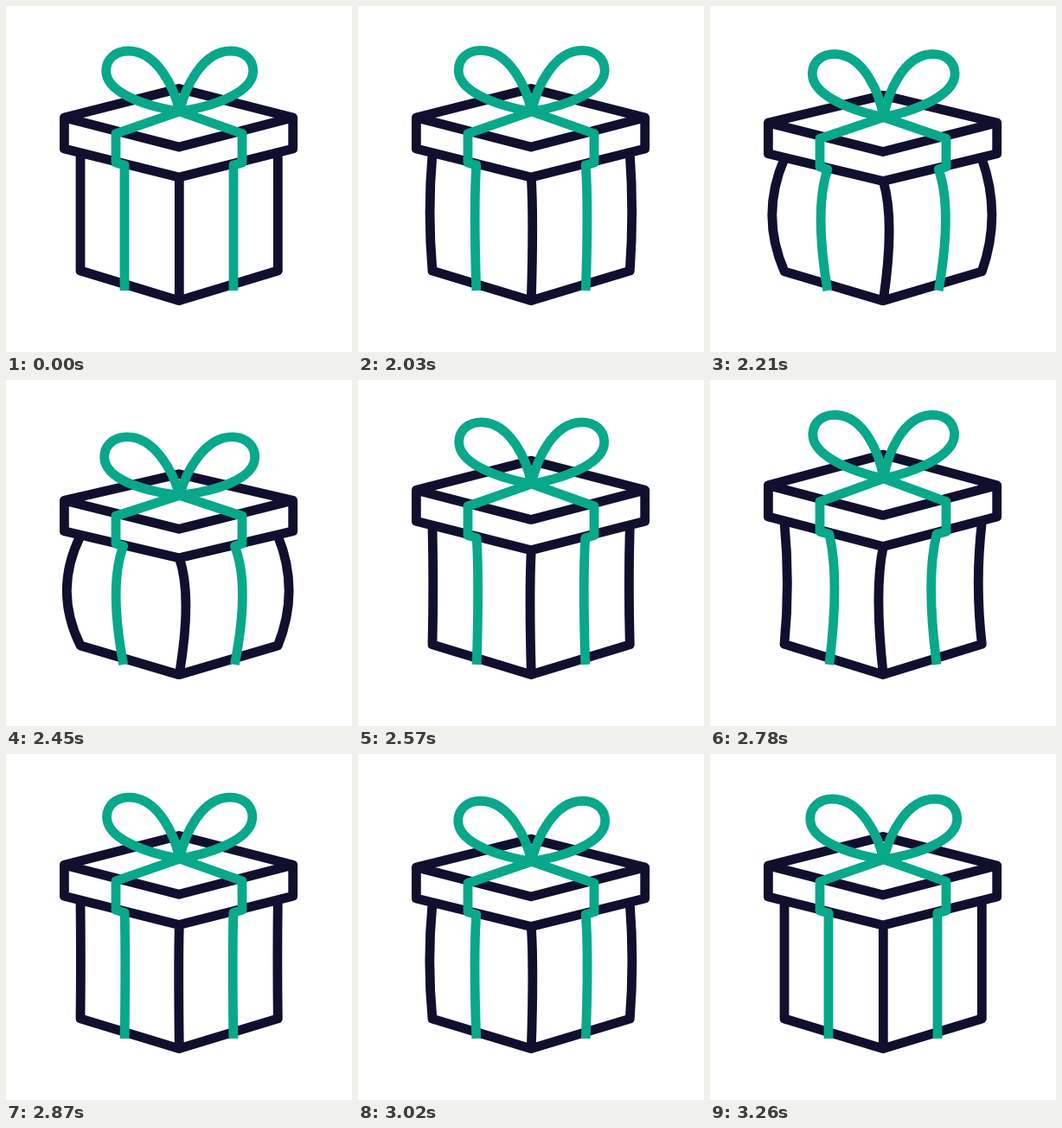
Recreate the animation shown at these times as an HTML page. Size 400 px wide and 400 px high, loop 3.35 s.

```html
<!DOCTYPE html>
<html lang="en">
<head>
<meta charset="utf-8">
<title>Gift box</title>
<style>
  html, body { margin: 0; width: 100%; height: 100%; overflow: hidden; background: #fff; }
  svg { display: block; width: 100%; height: 100%; }
  path { fill: none; stroke-width: 10.8; stroke-linejoin: round; }
  #box { stroke: #100f2e; stroke-linecap: round; }
  #ribbon { stroke: #08a88a; }
</style>
</head>
<body>
<svg viewBox="0 0 400 400">
  <path id="box"/>
  <path id="ribbon"/>
</svg>
<script>
const LOOP = 3350, START = 2030, LENGTH = 1230, STEP = 30, SQUASH = 360;
const { PI, sin, cos, exp, max, floor } = Math;
const box = document.getElementById('box');
const ribbon = document.getElementById('ribbon');

// Swing back up after the squash, then fade out.
const rebound = u => cos(PI * (u - SQUASH) / 330) * (1 - max(0, (u - 660) / 570)) ** 2;
const drop = u => 12.2 * (u < SQUASH ? (1 - cos(PI * u / SQUASH)) / 2 : rebound(u));
const bulge = u => 1.13 * (u < SQUASH ? sin(PI / 2 * (u + 40) / (SQUASH + 40)) : rebound(u));

// The loops flap up, down and up again; the result is an angle in radians.
const pulse = (u, peak) => exp(-(((u - peak) / 140) ** 2));
const flap = u => (3.2 * pulse(u, 180) - 3 * pulse(u, 420) + 5.5 * pulse(u, 660)) * PI / 180;

// Upright edge bending sideways by `bend` at its middle.
const edge = (x, top, bottom, bend, lift = 0) =>
  `${x} ${top} Q${x + 2 * bend} ${(top + bottom) / 2 - lift} ${x} ${bottom}`;

function loop(side, y, angle) {
  const c = cos(angle), s = sin(angle);
  const p = (dx, dy) => `${200.7 + side * (dx * c + dy * s)} ${y + dy * c - dx * s}`;
  return `M${p(0, 0)}C${p(6, -27)} ${p(26, -70)} ${p(59, -70)}` +
    `C${p(75, -70)} ${p(85, -60)} ${p(85, -47)}C${p(85, -23)} ${p(44, -7)} ${p(0, 0)}`;
}

function draw(u) {
  const moving = u >= 0 && u < LENGTH;
  const [d, b, angle] = moving ? [drop(u), bulge(u), flap(u)] : [0, 0, 0];

  const side = 129 + d, rim = 165 + .95 * d, front = 163 + .9 * d, lower = 198 + .75 * d;
  const lid = `M67.4 ${side}L200 ${95.5 + 1.28 * d}L331.7 ${side}L200 ${front}Z` +
    `M67.4 ${side}V${rim}L200 ${lower}L331.7 ${rim}V${side}`;
  const top = 171 + .9 * d, foot = 306 + b;
  const body = 'M' + edge(86, top, foot, b * (b > 0 ? -16.5 : -5)) + `L200 340.7L314.3 ${foot}` +
    'M' + edge(314.3, top, foot, b * (b > 0 ? 13.5 : 6)) +
    'M' + edge(200.3, lower, 340.7, b * 8, 24);
  box.setAttribute('d', lid + body);

  const knot = 122 + 1.1 * d, corner = 147.5 + .95 * d, hem = 181 + .8 * d;
  const strap = (outer, inner, bend) =>
    `M200.7 ${knot}L${outer} ${corner}V${hem}L` + edge(inner + .15 * bend, hem + 3, 329, bend, 24);
  ribbon.setAttribute('d', strap(127, 137, -9 * b) + strap(273, 263, 9.5 * b) +
    loop(-1, knot, angle) + loop(1, knot, angle));
}

function frame() {
  const t = performance.now() % LOOP;
  draw(floor((t - START) / STEP) * STEP);
  requestAnimationFrame(frame);
}
frame();
</script>
</body>
</html>
```
